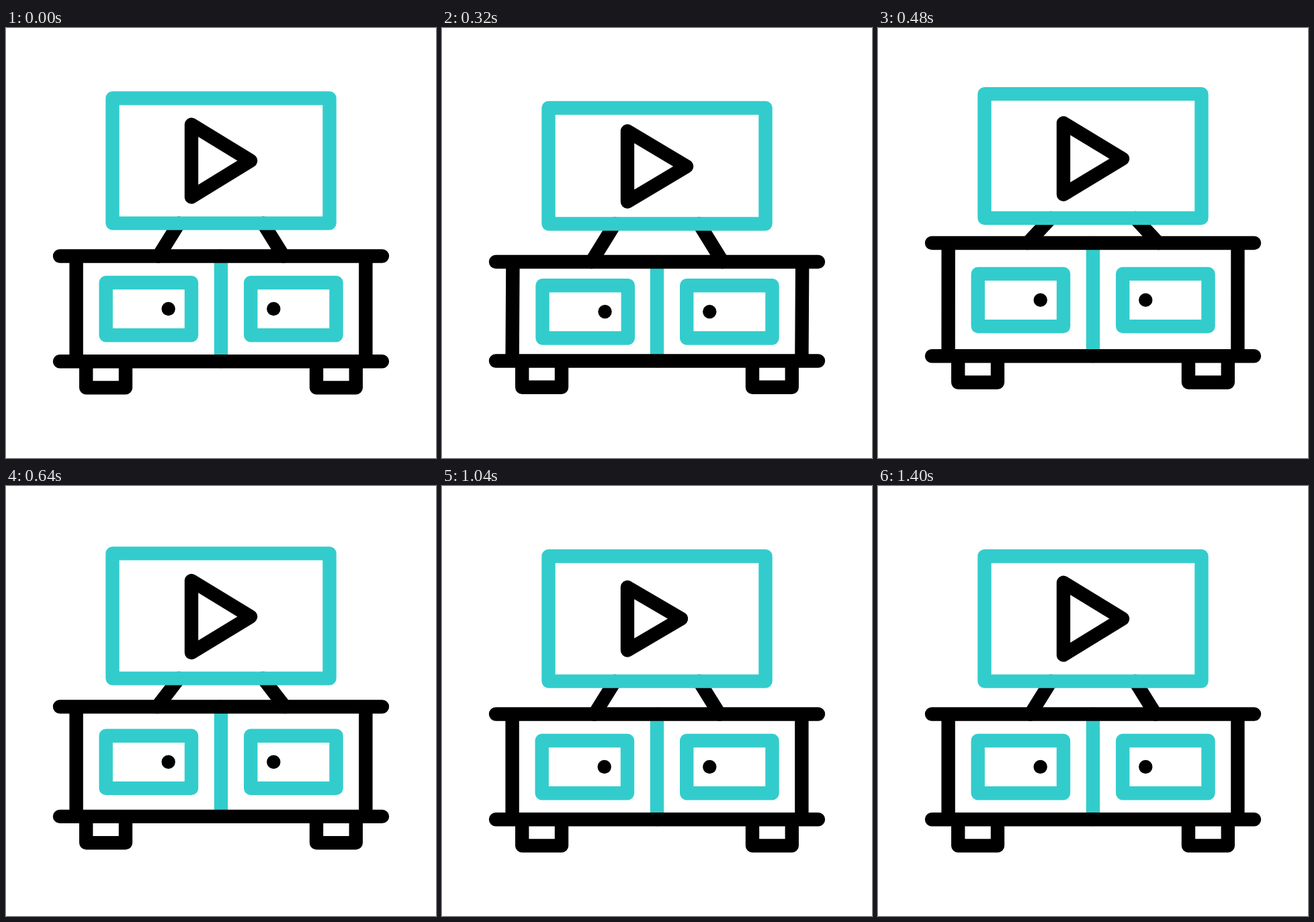
Animation of 640 by 640 pixels, one loop 1.48 s. Source, as an HTML page:

```html
<!DOCTYPE html>
<html lang="en">
<head>
<meta charset="utf-8">
<title>TV stand</title>
<style>
  html, body { margin: 0; width: 100%; height: 100%; overflow: hidden; background: #fff; }
  svg { display: block; width: 100%; height: 100%; }
  path { fill: none; stroke: #000; stroke-width: 20.4; stroke-linejoin: round; stroke-linecap: round; }
  .teal { stroke: #33cccc; }
</style>
</head>
<body>
<svg viewBox="0 0 640 640">
  <path id="stand"/>
  <path id="screen" class="teal"/>
  <path id="play"/>
  <path id="divider" class="teal"/>
  <path id="doors" class="teal"/>
  <path id="cabinet"/>
  <circle id="knobL" r="10.2"/>
  <circle id="knobR" r="10.2" cx="398.3"/>
</svg>
<script>
const LOOP = 1480, STEP = 40;
const $ = id => document.getElementById(id);
const draw = (id, d) => $(id).setAttribute('d', d);
const box = (l, t, r, b) => `M${l} ${t}H${r}V${b}H${l}Z`;

// Key times of the hop, of the play sign that trails it, and of its pulse
const HOP = [80, 280, 520, 760];
const TRAIL = [80, 320, 540, 760];
const PULSE = [920, 1160, 1400];

// Eased travel through values placed at key times
function track(t, times, values) {
  if (t <= times[0]) return values[0];
  for (let i = 1; i < times.length; i++) {
    if (t < times[i]) {
      const p = (t - times[i - 1]) / (times[i] - times[i - 1]);
      return values[i - 1] + (values[i] - values[i - 1]) * p * p * (3 - 2 * p);
    }
  }
  return values[values.length - 1];
}

function render(t) {
  const hop = (rest, squash, leap) => rest + track(t, HOP, [0, squash, leap, 0]);
  const trail = (rest, squash, leap) => rest + track(t, TRAIL, [0, squash, leap, 0]);
  const pulse = amount => track(t, PULSE, [0, amount, 0]);

  const top = hop(104.5, 16.3, -8.2), bottom = hop(290.6, 1.6, -8.5);
  const shelf = hop(339.5, 10.9, -22), base = hop(496.2, 0, -8.6);
  const door = hop(379, 5.8, -14.6), lean = hop(0, 0.9, 0);
  const splay = hop(227, -4.5, -4);
  const foot = base + 39.2;

  draw('stand', `M257.4 ${bottom}L${splay} ${shelf}M382.6 ${bottom}L${640 - splay} ${shelf}`);
  draw('screen', box(158.5, top, 481.5, bottom));
  draw('play', `M276 ${trail(143.7, 9.7, -5) + pulse(14)}` +
    `V${trail(251.5, 7, -6.1) - pulse(14)}` +
    `L${364 - pulse(16)} ${trail(197.5, 8.4, -5.4)}Z`);
  draw('divider', `M320 ${shelf}V${base}`);
  draw('doors', box(148.7 + lean, door, 276 + lean, door + 78.2) +
    box(364.2, door, 491.5, door + 78.2));
  draw('cabinet', `M80 ${shelf}H560M80 ${base}H560` +
    `M${104.6 + lean} ${shelf}L104.6 ${base}M${535.4 + lean} ${shelf}L535.4 ${base}` +
    `M119.2 ${base}V${foot}H178V${base}M462 ${base}V${foot}H520.8V${base}`);
  $('knobL').setAttribute('cx', 241.7 + lean);
  for (const id of ['knobL', 'knobR']) $(id).setAttribute('cy', door + 39);
}

const start = performance.now();
function tick() {
  const t = (performance.now() - start) % LOOP;
  render(Math.floor(t / STEP) * STEP);
  requestAnimationFrame(tick);
}
tick();
</script>
</body>
</html>
```
